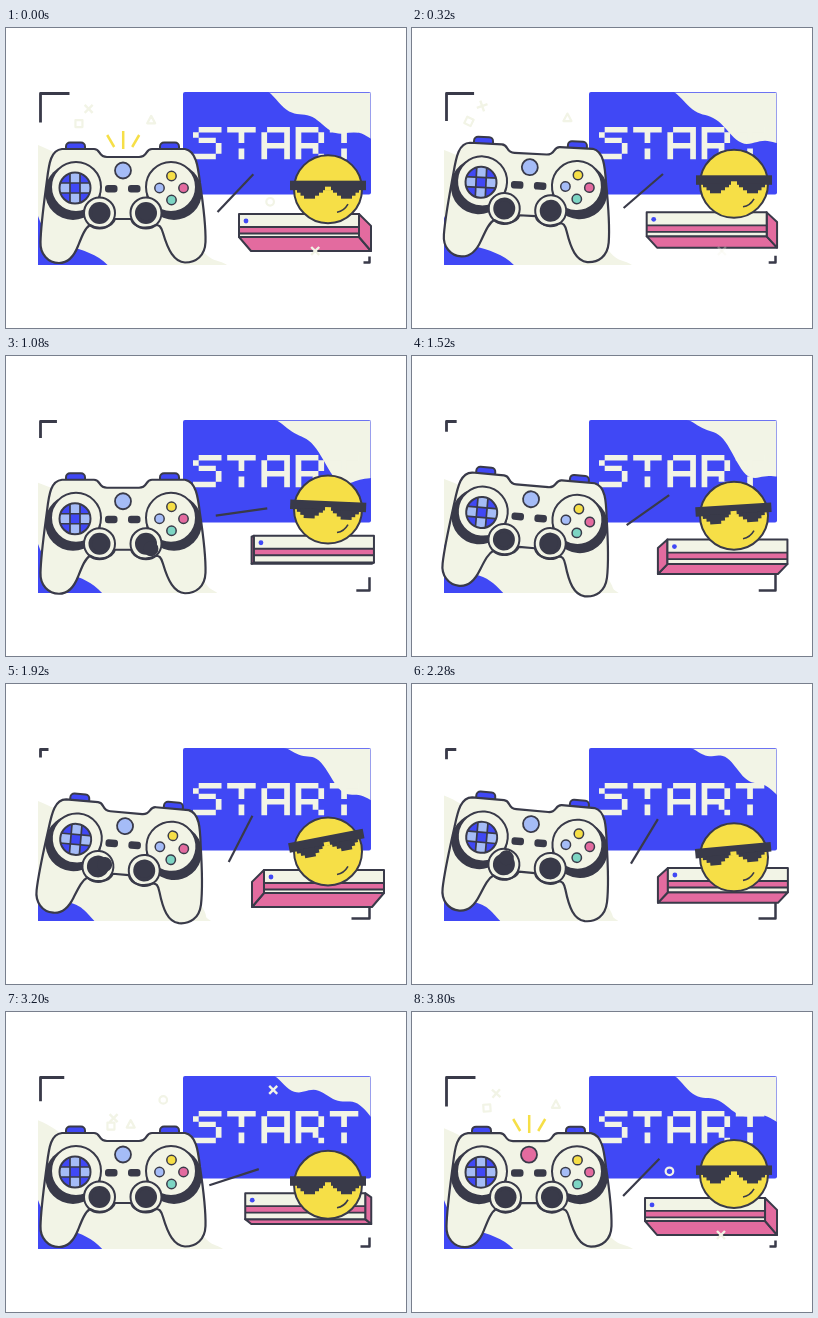
Write an HTML page with a canvas that moves like this. It is 400 by 300 pixels and loops after 3.84 s.

```html
<!DOCTYPE html>
<html lang="en">
<head>
<meta charset="utf-8">
<title>Start</title>
<style>
html, body { margin: 0; width: 100%; height: 100%; overflow: hidden; background: #fff; }
canvas { display: block; width: 400px; height: 300px; }
</style>
</head>
<body>
<canvas id="stage" width="400" height="300"></canvas>
<script>
const ctx = document.getElementById('stage').getContext('2d');
const LOOP = 3840, RAD = Math.PI / 180;
const BLUE = '#4048f5', CREAM = '#f2f4e6', DARK = '#393a49', YELLOW = '#f6df47';
const PINK = '#e36b9f', SKY = '#a5bcf7', TEAL = '#7dd5c3';

const clamp = v => Math.max(0, Math.min(1, v));
const smooth = v => { v = clamp(v); return v * v * (3 - 2 * v); };
const bump = (t, from, to, ramp = 300) => smooth((t - from) / ramp) * smooth((to - t) / ramp);
// A cosine that runs once per loop and peaks at the given phase in degrees.
const sway = (t, mean, amp, phase = 0, turns = 1) =>
  mean + amp * Math.cos((360 * turns * t / LOOP - phase) * RAD);

function paint(path, fill, stroke, width = 2) {
  if (fill) { ctx.fillStyle = fill; ctx.fill(path); }
  if (stroke) { ctx.strokeStyle = stroke; ctx.lineWidth = width; ctx.stroke(path); }
}
function disc(x, y, r, fill, stroke, width) {
  const p = new Path2D();
  p.arc(x, y, r, 0, 7);
  paint(p, fill, stroke, width);
}
function poly(points, fill, stroke, width) {
  const p = new Path2D();
  points.forEach(([x, y]) => p.lineTo(x, y));
  p.closePath();
  paint(p, fill, stroke, width);
}
function line(points, color, width) {
  const p = new Path2D();
  points.forEach(([x, y]) => p.lineTo(x, y));
  paint(p, null, color, width);
}
function box(x, y, w, h, color) {
  ctx.fillStyle = color;
  ctx.fillRect(x, y, w, h);
}
function roundBox(x, y, w, h, r, fill, stroke) {
  const p = new Path2D();
  p.roundRect(x, y, w, h, r);
  paint(p, fill, stroke);
}
function within(path, draw) {
  ctx.save();
  ctx.clip(path);
  draw();
  ctx.restore();
}

const GLYPHS = {
  S: ['.####', '#....', '.###.', '....#', '....#', '####.'],
  T: ['#####', '..#..', '..#..', '.....', '..#..', '..#..'],
  A: ['.####', '#...#', '#...#', '#####', '#...#', '#...#'],
  R: ['####.', '#...#', '#...#', '####.', '#..#.', '#...#']
};
const title = new Path2D();
[...'START'].forEach((letter, n) => GLYPHS[letter].forEach((row, j) => {
  for (const run of row.matchAll(/#+/g))
    title.rect(187 + (n * 6 + run.index) * 5.7, 99 + j * 5.35, run[0].length * 5.7, 5.4);
}));

const leftPanel = new Path2D('M32 64H240V237H32Z');
const rightPanel = new Path2D();
rightPanel.roundRect(177, 64, 188, 102.5, 2);
const rightInset = new Path2D('M177 64.7H364.5V166H177Z');
const padBody = new Path2D('M56 121H88C95 121 92 129 101 129H133C142 129 139 121 146 121H179' +
  'C190 123 192 138 194 155C197 175 200 195 199.5 214C199 228 190 234.5 179 234.5' +
  'C168 234 162 222 157 205C155 198 153 197 150 197C140 202 128 200 125 191H109' +
  'C106 200 92 202 84 197C79 200 76 208 72 218C67 231 60 235 53 235' +
  'C42 235 34 226 34.5 214C35 195 38 175 41 152C43 135 45 122 56 121Z');

function drawPanels(t) {
  within(leftPanel, () => {
    const top = sway(t, 117, 10, 90), end = sway(t, 213, 8);
    paint(new Path2D(`M32 ${top}C58 ${top + 10} 70 140 100 150S178 195 192 216S${end - 10} 230 ${end} 237H32Z`), CREAM);
    const e = sway(t, 95, 7, 20);
    paint(new Path2D(`M32 188C38 206 48 214 62 218S${e - 10} 226 ${e} 237H32Z`), BLUE);
  });
  paint(rightPanel, BLUE);
  within(rightInset, () => {
    const left = sway(t, 270, 8, 200), end = sway(t, 114, 8, 110);
    const sag = sway(t, 4, 11, 65), skew = sway(t, -2, 8, 300);
    const p = new Path2D();
    for (let u = 0; u <= 1.001; u += 0.025) {
      const arch = Math.sin(Math.PI * u);
      const ripple = 4.5 * Math.sin(4 * Math.PI * u - 0.4) * Math.sqrt(Math.abs(arch));
      p.lineTo(left + (366 - left) * u, 64 + (end - 64) * u + sag * arch + skew * Math.sin(2 * Math.PI * u) + ripple);
    }
    p.lineTo(366, 64);
    paint(p, CREAM);
    paint(title, CREAM);
  });
}

function drawBrackets(t) {
  const a = sway(t, 18.5, 10.5), b = sway(t, 12, -6);
  line([[34.5, 65.5 + a], [34.5, 65.5], [34.5 + a, 65.5]], DARK, 2.8);
  line([[363.5, 234.5 - b], [363.5, 234.5], [363.5 - b, 234.5]], DARK, 2.5);
}

function drawStreak(t) {
  const a = (sway(t, 34, 22, 20, 2) + sway(t, 0, 10, 215)) * RAD;
  const dx = 26 * Math.cos(a), dy = 26 * Math.sin(a);
  const x = sway(t, 232, 4, 130), y = sway(t, 160, 6, -30);
  line([[x - dx, y + dy], [x + dx, y - dy]], DARK, 2.2);
}

function drawConsole(t) {
  const c = sway(t, 0, 1);
  const x = 245.5 - 12.5 * c, y = 179.5 + 6.5 * c * c, w = 120, h = 27 - 4 * c * c;
  const dx = 12 * c, dy = 14 * Math.abs(c) ** 1.5;
  const side = c > 0 ? x + w : x;
  poly([[x, y + h], [x + w, y + h], [x + w + dx, y + h + dy], [x + dx, y + h + dy]], PINK, DARK);
  poly([[side, y], [side + dx, y + dy * 0.85], [side + dx, y + h + dy], [side, y + h]], PINK, DARK);
  box(x, y, w, h, CREAM);
  box(x, y + 13, w, 6.5, PINK);
  [13, 19.5].forEach(d => line([[x, y + d], [x + w, y + d]], DARK, 1.8));
  poly([[x, y], [x + w, y], [x + w, y + h], [x, y + h]], null, DARK);
  disc(x + 7, y + 7, 2.4, BLUE);
}

function drawFace(t) {
  ctx.save();
  ctx.translate(322, sway(t, 164.3, 12, 255));
  disc(0, 0, 34, YELLOW, DARK);
  paint(new Path2D('M9 23Q16 22 20 15'), null, DARK, 1.6);
  const slip = bump(t, 1350, 2500, 450);
  ctx.translate(-slip, -7 * slip);
  ctx.rotate((2.5 * bump(t, 750, 1400) - 11 * slip) * RAD);
  box(-38, -8.5, 76, 9.5, DARK);
  for (let i = 0; i < 3; i++) {
    const outer = 31 - 3.5 * i, inner = 5 + 4 * i;
    box(-outer, 0, outer - inner, 3.5 + 3 * i, DARK);
    box(inner, 0, outer - inner, 3.5 + 3 * i, DARK);
  }
  box(-3, -2.5, 6, 4, YELLOW);
  ctx.restore();
}

function drawDpad(pressed) {
  const ring = new Path2D();
  ring.arc(69, 160, 15.5, 0, 7);
  paint(ring, BLUE);
  within(ring, () => {
    box(64, 143, 10, 34, SKY);
    box(52, 155, 34, 10, SKY);
    box(64, 155, 10, 10, BLUE);
    if (pressed) box(64, 143, 10, 12, '#747685');
    [64, 74].forEach(x => line([[x, 143], [x, 177]], DARK, 1.7));
    [155, 165].forEach(y => line([[52, y], [86, y]], DARK, 1.7));
  });
  paint(ring, null, DARK);
}

function drawStick(x, y, reach, angle) {
  disc(x, y, 15.5, CREAM, DARK);
  disc(x, y, 11, DARK);
  disc(x + reach * Math.cos(angle * RAD), y + reach * Math.sin(angle * RAD), 7.5, DARK);
}

function drawPad(t) {
  const first = bump(t, 100, 1000), second = bump(t, 1200, 3150);
  const lift = 3.2 * bump(t, 850, 2100) + 2 * bump(t, 3300, LOOP, 250) - 4 * first - 2.5 * second;
  ctx.save();
  ctx.translate(117 + 0.6 * second, 159 + lift);
  ctx.rotate((3.4 * first + 5 * second) * RAD);
  ctx.translate(-117, -159);
  [60, 154].forEach(x => roundBox(x, 114.5, 19, 12, 4, BLUE, DARK));
  paint(padBody, CREAM);
  within(padBody, () => {
    disc(67, 164, 28, DARK);
    disc(168, 164, 28, DARK);
  });
  disc(70, 159, 25, CREAM, DARK);
  disc(165, 159, 25, CREAM, DARK);
  drawStick(93.5, 185, 7 * bump(t, 1500, 3000), -20 - 0.153 * (t - 1920));
  drawStick(140, 185, 7 * bump(t, 250, 1450), -50 + 0.198 * (t - 600));
  paint(padBody, null, DARK, 2.2);
  drawDpad(t > 440 && t < 800);
  [99, 122].forEach(x => roundBox(x, 157, 12.5, 7.5, 3, DARK));
  disc(117, 142.5, 8, t >= 3620 ? PINK : SKY, DARK, 1.8);
  [SKY, YELLOW, PINK, TEAL].forEach((color, i) => {
    const a = (i * 90 - 180) * RAD;
    disc(165.5 + 12 * Math.cos(a), 160 + 12 * Math.sin(a), 4.7, color, DARK, 1.5);
  });
  ctx.restore();
}

function drawSparks(t) {
  const age = (t - 3560 + LOOP) % LOOP;
  const tip = clamp(age / 200), tail = clamp((age - 340) / 220);
  if (tail === 1) return;
  [-1, 0, 1].forEach(side => {
    const reach = side ? 12 : 18;
    const at = k => [117.2 + side * (9 + 7 * k), 121 - Math.abs(side) * 2 - reach * k];
    line([at(tail), at(tip)], YELLOW, 2.5);
  });
}

const rise = (drift, height) => age => [117 + drift * age, 136 - height * (1 - Math.exp(-age / 350))];
const floats = [
  { shape: 'x', life: 1600, spin: true, at: rise(-0.039, 60) },
  { shape: 'square', life: 1600, spin: true, at: rise(-0.05, 44) },
  { shape: 'triangle', life: 1350, at: rise(0.032, 48) },
  { shape: 'circle', life: 1050, at: age => [117 + 0.167 * age, 136 - 0.291 * age + 0.000379 * age * age] },
  {
    shape: 'x', life: 1250,
    at: age => [117 + 193 * (1 - Math.exp(-age / 160)), Math.min(223, 136 - 0.392 * age + 0.000626 * age * age)]
  }
];
const SHAPES = {
  x() {
    line([[-4, -4], [4, 4]], CREAM, 2.4);
    line([[-4, 4], [4, -4]], CREAM, 2.4);
  },
  square: () => poly([[-3.5, -3.5], [3.5, -3.5], [3.5, 3.5], [-3.5, 3.5]], null, CREAM, 2.2),
  triangle: () => poly([[0, -4], [4, 3.5], [-4, 3.5]], null, CREAM, 2.2),
  circle: () => disc(0, 0, 3.8, null, CREAM, 2.2)
};
function drawFloat(t, { shape, life, spin, at }) {
  const age = (t - 2960 + LOOP) % LOOP;
  if (age > life) return;
  ctx.save();
  ctx.globalAlpha = clamp((life - age) / 150);
  ctx.translate(...at(age));
  if (spin) ctx.rotate(231 * (0.376 - Math.exp(-age / 900)) * RAD);
  SHAPES[shape]();
  ctx.restore();
}

function render(t) {
  ctx.lineJoin = 'round';
  box(0, 0, 400, 300, '#fff');
  drawPanels(t);
  drawBrackets(t);
  drawStreak(t);
  drawConsole(t);
  drawFace(t);
  floats.forEach(f => drawFloat(t, f));
  drawSparks(t);
  drawPad(t);
}

const start = performance.now();
function tick() {
  render((performance.now() - start) % LOOP);
  requestAnimationFrame(tick);
}
tick();
</script>
</body>
</html>
```
